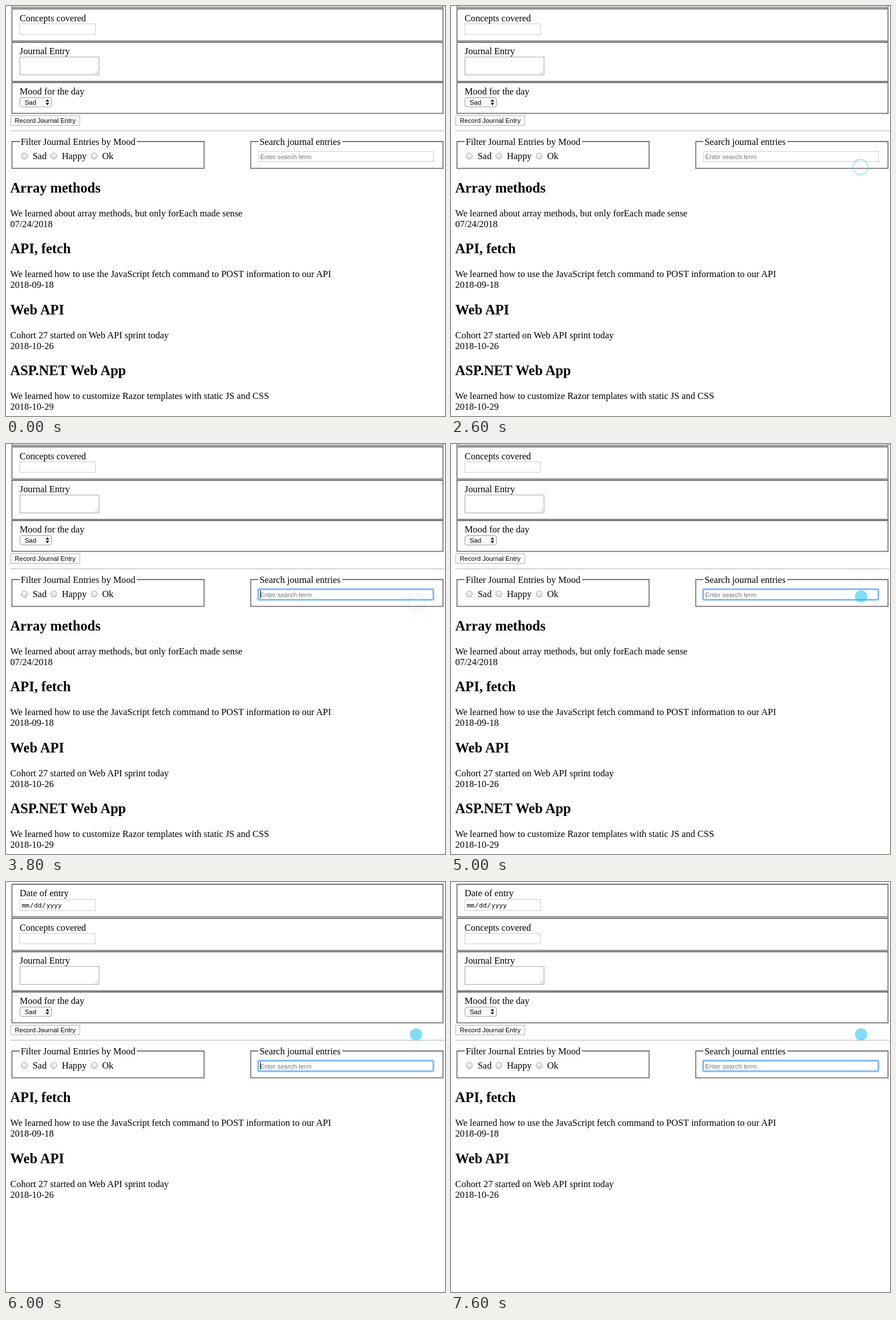
Write an HTML page that moves like this. It is 774 px wide and 723 px high and loops after 8 s.

```html
<!DOCTYPE html>
<html lang="en">
<head>
<meta charset="utf-8">
<title>Journal search</title>
<style>
  html, body { margin: 0; width: 100%; height: 100%; overflow: hidden; background: #fff; }
  svg { display: block; width: 774px; height: 723px; }
  text { font: 16.4px "Liberation Serif", "Times New Roman", serif; }
  .title { font-size: 24.6px; font-weight: bold; }
  .ui { font: 11.4px "Liberation Sans", Arial, sans-serif; }
  .date { font: 11.2px "DejaVu Sans Mono", monospace; }
  .hint { fill: #757575; }
  .set { fill: none; stroke: #747474; stroke-width: 1.8; }
  .field { fill: #fff; stroke: #cdcdcd; }
  .area { fill: #fff; stroke: #a3a3a3; }
  .radio { fill: url(#knob); stroke: #9b9b9b; }
</style>
</head>
<body>
<svg viewBox="0 0 774 723">
  <defs>
    <linearGradient id="knob" x2="0" y2="1">
      <stop stop-color="#fbfbfb"/><stop offset="1" stop-color="#dcdcdc"/>
    </linearGradient>
  </defs>

  <g id="form">
    <g class="set">
      <path d="M10.5-55H770.5V2.3H10.5Z"/>
      <path d="M10.5 5H770.5V61.7H10.5Z"/>
      <path d="M10.5 64H770.5V132.8H10.5Z"/>
      <path d="M10.5 135H770.5V189.3H10.5Z"/>
      <path d="M24 239H10.5V286.3H349.3V239H231"/>
      <path d="M445 239H431.5V286.3H770.5V239H593"/>
    </g>

    <text x="24" y="-34">Date of entry</text>
    <rect class="field" x="24.5" y="-28.5" width="133" height="20"/>
    <text class="date" y="-14.5"><tspan x="27.8">mm</tspan><tspan x="42">/</tspan><tspan x="49.6">dd</tspan><tspan x="63.6">/</tspan><tspan x="71.2">yyyy</tspan></text>

    <text x="24" y="27">Concepts covered</text>
    <rect class="field" x="24.5" y="31.5" width="133" height="18.5"/>

    <text x="24" y="85">Journal Entry</text>
    <rect class="area" x="24.5" y="90" width="139.5" height="31.5"/>
    <path d="M157 120l5.5-5.5M160 120l2.5-2.5" stroke="#999" stroke-width=".8"/>

    <text x="24" y="156">Mood for the day</text>
    <rect x="24.5" y="161.5" width="56" height="16.5" rx="3.5" fill="#fafafa" stroke="#9a9a9a"/>
    <text class="ui" x="33" y="174">Sad</text>
    <path d="M70 168.6l3-4.2 3 4.2zM70 170.8l3 4.2 3-4.2z"/>

    <rect x="8.5" y="193.5" width="121.5" height="17" fill="#fff" stroke="#b0b0b0"/>
    <text class="ui" x="15.6" y="206">Record Journal Entry</text>
    <path d="M7.5 220H773.5" stroke="#a8a8a8" stroke-width="1.2"/>
    <path d="M7.5 221H773.5" stroke="#e4e4e4" stroke-width=".8"/>

    <text x="26" y="245">Filter Journal Entries by Mood</text>
    <circle class="radio" cx="32.3" cy="264.5" r="5.3"/>
    <text x="47" y="270">Sad</text>
    <circle class="radio" cx="84.3" cy="264.5" r="5.3"/>
    <text x="98.5" y="270">Happy</text>
    <circle class="radio" cx="155.5" cy="264.5" r="5.3"/>
    <text x="169.5" y="270">Ok</text>

    <text x="447" y="245">Search journal entries</text>
    <rect class="field" x="445" y="256.5" width="308.5" height="18"/>
    <g id="focus" fill="none">
      <rect x="444.2" y="255.7" width="309.6" height="19.4" rx="2" stroke="#c4e0fc" stroke-width="3.4"/>
      <rect x="444.7" y="256.2" width="308.6" height="18.4" rx="1.5" stroke="#6cb0f5" stroke-width="2"/>
    </g>
    <text id="query" class="ui" x="448.2" y="269.5"></text>
    <rect id="caret" y="258" width="1" height="14"/>
  </g>

  <g id="entries"></g>
  <circle id="dot" r="10.8" fill="#00bef7" fill-opacity=".5"/>
  <circle id="ring" fill="none" stroke="#2fcdf5" stroke-width="2"/>
</svg>

<script>
const LOOP = 8000;
const HINT = 'Enter search term';
const $ = id => document.getElementById(id);
const set = (el, attrs) => { for (const k in attrs) el.setAttribute(k, attrs[k]); };
const show = (el, on) => set(el, { visibility: on ? 'visible' : 'hidden' });

const entries = [
  ['Array methods', 'We learned about array methods, but only forEach made sense', '07/24/2018'],
  ['API, fetch', 'We learned how to use the JavaScript fetch command to POST information to our API', '2018-09-18'],
  ['Web API', 'Cohort 27 started on Web API sprint today', '2018-10-26'],
  ['ASP.NET Web App', 'We learned how to customize Razor templates with static JS and CSS', '2018-10-29']
].map((lines, i) => {
  const g = document.createElementNS('http://www.w3.org/2000/svg', 'g');
  const top = Math.round(i * 107.3);
  lines.forEach((line, n) => {
    const t = document.createElementNS(g.namespaceURI, 'text');
    set(t, { x: 7.6, y: top + [329, 371, 390][n], class: n ? 'line' : 'title' });
    t.textContent = line;
    g.append(t);
  });
  $('entries').append(g);
  return { g, match: /API/.test(lines[0]) };
});

// Pointer steps: [time, x, y] for the dot, plus [radius, opacity] for a click ring.
const pointer = [
  [0],
  [600, 762, 284.5],
  [800, 722, 273],
  [2600, 722, 284, 13.4, .42],
  [2800, 722, 284, 14.2, .29],
  [3000, 722, 283.5, 14.8, .15],
  [3200, 722.5, 268.7],
  [3400, 723.5, 280, 13.4, .42],
  [3600, 723.5, 280, 14.2, .29],
  [3800, 723.5, 279.5, 14.5, .15],
  [4000, 723, 268.7]
];
// Caret steps: [time, x], without x while hidden.
const caret = [
  [0], [3400, 448], [4000], [4400, 448], [5000], [5200, 454], [5400, 460],
  [5600, 463], [6000, 448], [6600], [7000, 448], [7600]
];
const typed = [[0, ''], [5200, 'a'], [5400, 'ap'], [5600, 'api'], [6000, '']];
const at = (steps, t) => steps.findLast(s => s[0] <= t);

function draw(t) {
  const [, x, y, r, opacity] = at(pointer, t);
  show($('dot'), x && !r);
  show($('ring'), r);
  if (x) set(r ? $('ring') : $('dot'), { cx: x, cy: y });
  if (r) set($('ring'), { r, opacity });

  const cx = at(caret, t)[1];
  show($('caret'), cx);
  if (cx) set($('caret'), { x: cx });

  const word = at(typed, t)[1];
  $('query').textContent = word || HINT;
  $('query').classList.toggle('hint', !word);
  show($('focus'), t >= 3400);

  const filtered = t >= 6000;
  set($('form'), { transform: `translate(0 ${filtered ? 59 : 0})` });
  set($('entries'), { transform: `translate(0 ${filtered ? -48 : 0})` });
  entries.forEach(e => show(e.g, !filtered || e.match));
}

const start = performance.now();
function tick() {
  draw((performance.now() - start) % LOOP);
  requestAnimationFrame(tick);
}
tick();
</script>
</body>
</html>
```
